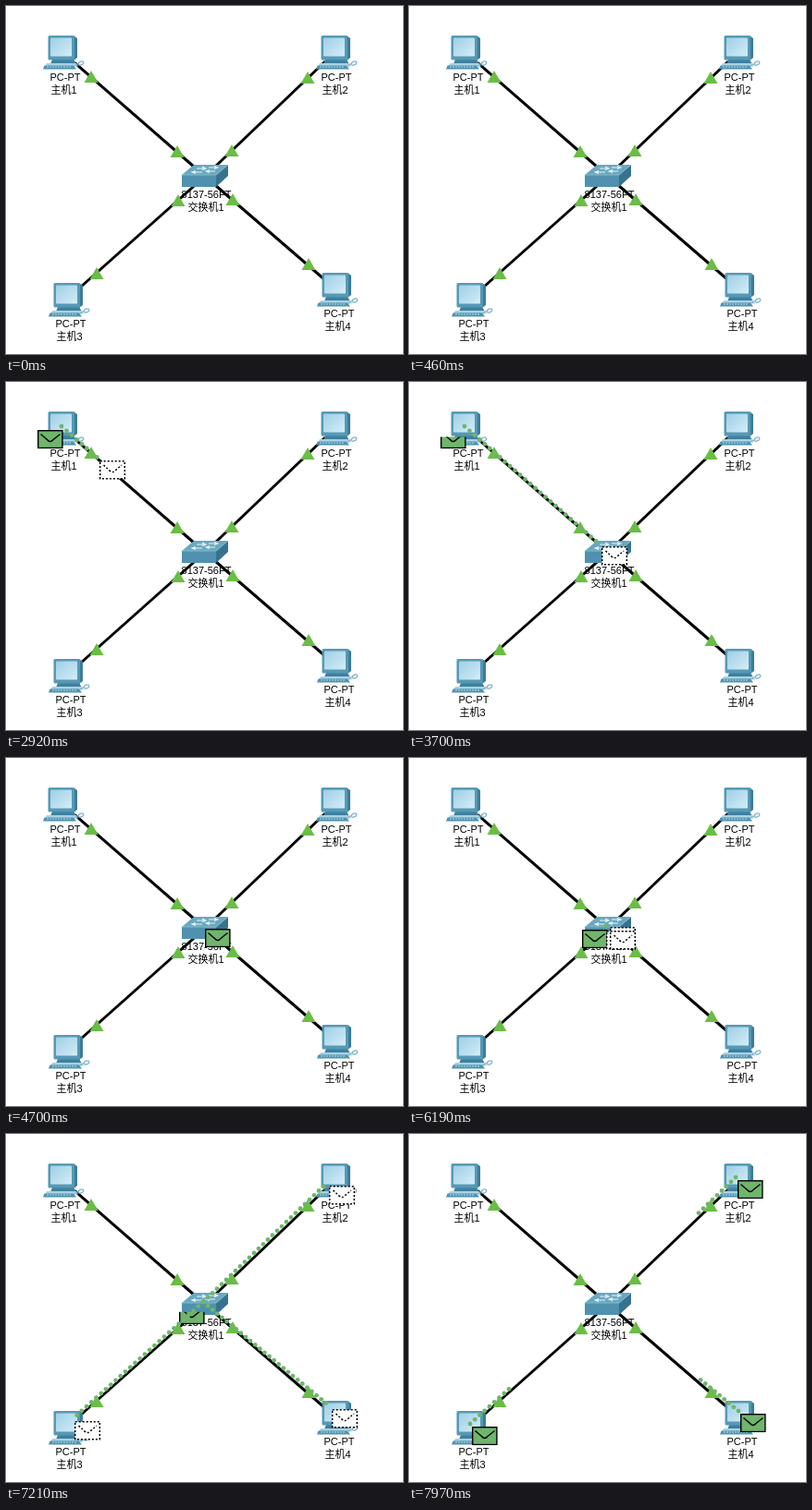
Write an HTML page that moves like this. It is 429x377 px and loops after 8 s.

```html
<!DOCTYPE html>
<html lang="zh">
<head>
<meta charset="utf-8">
<title>Network packet flow</title>
<style>
  html, body { margin: 0; width: 100%; height: 100%; overflow: hidden; background: #fff; }
  svg { display: block; width: 429px; height: 377px; }
  text { font: 11px "Liberation Sans", "Noto Sans CJK SC", "Noto Sans CJK", sans-serif; text-anchor: middle; fill: #000; }
</style>
</head>
<body>
<svg viewBox="0 0 429 377">
  <defs>
    <linearGradient id="glass" x1="0" y1="0" x2="1" y2="1">
      <stop offset="0" stop-color="#9fcfe4"/>
      <stop offset="1" stop-color="#d3edf8"/>
    </linearGradient>
    <g id="pc">
      <path d="M33 1L37 4V25L33 28Z" fill="#3d7c99"/>
      <path d="M10 27H33L36 32H8Z" fill="#3f809e"/>
      <rect x="5.5" y="1" width="28.5" height="26.5" rx="1.5" fill="#5699b5"/>
      <rect x="8" y="3.5" width="23" height="20" rx="1" fill="url(#glass)"/>
      <path d="M4 31H36L38 34.5H2Z" fill="#a9d2e3"/>
      <path d="M1.5 33.5H33L36 37.5H0Z" fill="#4f93b0"/>
      <path d="M4 35H31" stroke="#b9dbe8" stroke-dasharray="2 1"/>
      <path d="M34 34Q37 31 39 32" fill="none" stroke="#6fa9c1"/>
      <ellipse cx="41" cy="31" rx="3" ry="2" transform="rotate(-25 41 31)" fill="#e6f1f6" stroke="#79adc3"/>
    </g>
    <g id="switch">
      <path d="M0 11L13 0H50L37 11Z" fill="#68a8c1"/>
      <path d="M0 11H37V24H0Z" fill="#4f91ae"/>
      <path d="M37 11L50 0V12L37 24Z" fill="#37728e"/>
      <path d="M0 11H37L50 0" fill="none" stroke="#8fc0d3" stroke-width=".8"/>
      <path d="M16 4H25M22 2L26 4L22 5.5M29 3H38M35 1.5L39 3L35 4.5M22 8H12M15 6.5L11 8L15 9.5M36 7H27M30 5.5L26 7L30 8.5"
        fill="none" stroke="#e9f5fa" stroke-width="1.1"/>
    </g>
    <g id="mail" stroke="#000" stroke-width="1.4">
      <rect x=".7" y=".7" width="26.2" height="18.8"/>
      <path d="M3.5 4.5L10.5 10.5Q13.8 14.5 17 10.5L24.5 4.5" fill="none"/>
    </g>
    <g id="ghost" fill="#fff" stroke="#000" stroke-width="1.5" stroke-dasharray="2 2">
      <rect x=".7" y=".7" width="26.6" height="19"/>
      <path d="M4.5 5L10.5 10.5Q14 14.5 17.5 10.5L24 5" fill="none"/>
    </g>
  </defs>
  <g id="scene"></g>
  <g id="queue">
    <use href="#mail" x="62" y="50" fill="#a4980f"/>
    <use href="#mail" x="87.5" y="50" fill="#6fb56c"/>
    <path id="pause" d="M74.5 53V60M79.5 53V60" stroke="#c4dfe8" stroke-width="3"/>
  </g>
  <g id="flow"></g>
</svg>
<script>
const LOOP = 8000, STEP = 77, DOTS = 28, GREEN = "#6fb56c";
const $ = id => document.getElementById(id);
const clamp = v => Math.max(0, Math.min(1, v));
const ramp = (v, from, length) => clamp((v - from) / length);

const hosts = [
  { icon: [40, 31], name: [64, 81], wire: [74, 61.3], lamps: [[92, 77], [185, 158]], port: [62, 51] },
  { icon: [335, 31], name: [357, 81], wire: [345, 60], lamps: [[326, 78], [244, 157]], port: [355, 50] },
  { icon: [46, 299], name: [70, 348], wire: [80, 305], lamps: [[98, 290], [186, 211]], port: [68, 317] },
  { icon: [336, 288], name: [360, 337], wire: [345, 297], lamps: [[327, 280], [245, 210]], port: [358, 303] }
];
const hub = [215, 185];

// times in steps of the simulation clock
const sends = [
  { at: 2610, end: 6190, from: hosts[0].port, to: [hub],
    move: [0.4, 14.3], drain: [11, 8], fill: [16.5, 8], erase: [16.7, 10] },
  { at: 6190, end: LOOP, from: hub, to: hosts.slice(1).map(h => h.port),
    move: [-0.2, 13.8], drain: [10.3, 8], fill: [15, 8], erase: [16, 10] }
];

const use = (id, [x, y], extra = "") => `<use href="#${id}" x="${x}" y="${y}" ${extra}/>`;
const label = (s, x, y) => `<text x="${x}" y="${y}">${s}</text>`;
const lamp = ([x, y]) => `<path d="M${x - 7.5} ${y + 6}L${x} ${y - 7}L${x + 7.5} ${y + 6}Z" fill="#6abd45"/>`;

function drawScene() {
  const wires = hosts.map(h => `<path d="M${h.wire}L215 184.5" stroke="#000" stroke-width="3"/>`);
  const icons = hosts.map(h => use("pc", h.icon));
  const names = hosts.map((h, i) =>
    label("PC-PT", h.name[0], h.name[1]) + label("主机" + (i + 1), h.name[0] - 1.5, h.name[1] + 14));
  const lamps = hosts.flatMap(h => h.lamps.map(lamp));
  $("scene").innerHTML = [...wires, ...icons, use("switch", [190, 172]), ...names,
    label("8137-56FT", 216.5, 208), label("交换机1", 216, 222), ...lamps].join("");
}

// green envelope showing only the rows between two shares of its height
function mail([x, y], top, bottom) {
  if (bottom <= top) return "";
  const h = 20.2;
  return `<svg x="${x}" y="${y + top * h}" width="28" height="${(bottom - top) * h}">` +
    use("mail", [0, -top * h], `fill="${GREEN}"`) + "</svg>";
}

function drawSend(s, t) {
  const k = Math.floor((t - s.at + 15) / STEP);
  const [move, drain, fill, erase] = [s.move, s.drain, s.fill, s.erase].map(r => ramp(k, ...r));
  const [x, y] = s.from;
  const point = (goal, p) => [x + (goal[0] - x) * p, y + (goal[1] - y) * p];
  let out = mail([x - 28, y + 1], drain, 1);
  for (const goal of s.to) {
    for (let i = 0; i <= DOTS; i++) {
      const p = i / DOTS;
      if (p > move || p < erase || erase === 1) continue;
      const [cx, cy] = point(goal, p);
      out += `<circle cx="${cx - 2}" cy="${cy - 3}" r="2.4" fill="${GREEN}"/>`;
    }
    if (fill < 1) out += use("ghost", point(goal, move).map(Math.round));
    out += mail(goal, 0, fill);
  }
  return out;
}

function render(t) {
  $("queue").style.display = t >= 1440 && t < 2610 ? "" : "none";
  $("pause").style.opacity = 1 - ramp(t, 2300, 160);
  const send = sends.find(s => t >= s.at && t < s.end);
  $("flow").innerHTML = send ? drawSend(send, t) : "";
}

drawScene();
const start = performance.now();
function tick() {
  render((performance.now() - start) % LOOP);
  requestAnimationFrame(tick);
}
tick();
</script>
</body>
</html>
```
